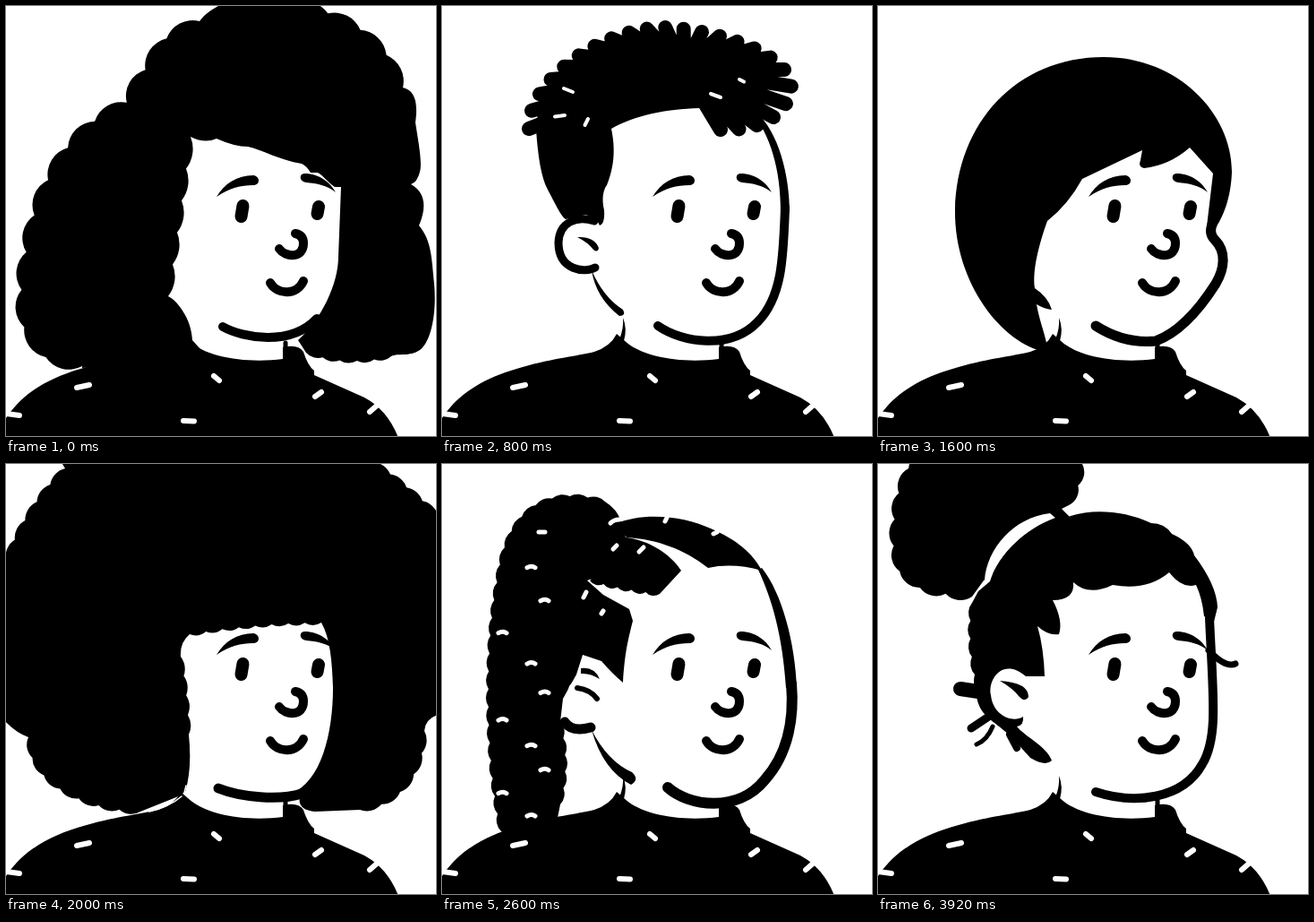
An HTML page that plays this animation: 480x480 px, repeating every 4250 ms.

```html
<!DOCTYPE html>
<html lang="en">
<head>
<meta charset="utf-8">
<title>Hairstyles</title>
<style>
  html, body { margin: 0; height: 100%; overflow: hidden; background: #fff; }
  svg { display: block; width: 100vw; height: 100vh; }
  .line { fill: none; stroke: #000; stroke-linecap: round; stroke-linejoin: round; }
  .white { stroke: #fff; }
</style>
</head>
<body>
<svg viewBox="0 0 480 480">
  <path d="M-2 463C17 433 46 415 90 403C125 393 150 391 170 386Q188 380 195 366L203 373C224 393 270 399 309 394V381Q326 377 332 386Q337 402 344 407V412L400 437Q426 451 438 482H-2Z"/>
  <path class="line white" stroke-width="6" d="M79 426L93 423M232 413L238 418M345 436L352 431M198 463L210 463.5M0 455L15 457M406 453L414 446"/>
  <g id="hair"></g>
  <path class="line" stroke-width="5" d="M312 376V390"/>
  <path d="M235 213C244 198 258 189 276 189C284 190 284 200 276 200C262 200 250 203 235 213ZM333 187C350 187 362 197 368 208C358 200 347 198 335 197C327 196 327 187 333 187Z"/>
  <path class="line" stroke-width="14" d="M264.5 223L262.5 235M349 224L347.5 232"/>
  <path class="line" stroke-width="10" d="M305 271C312 281 332 282 332 265C332 258 328 255 323 254M295 309C303 323 325 323 332 307"/>
</svg>
<script>
const fill = (d, color = '#000') => `<path d="${d}" fill="${color}"/>`;
const line = (d, width, cls = '') => `<path class="line ${cls}" stroke-width="${width}" d="${d}"/>`;
const white = (d, width) => line(d, width, 'white');
const ball = (x, y, r) => `<circle cx="${x}" cy="${y}" r="${r}"/>`;

// Evenly spaced points on a curve, about one every `step` units.
function along(d, step) {
  const path = document.createElementNS('http://www.w3.org/2000/svg', 'path');
  path.setAttribute('d', d);
  const length = path.getTotalLength();
  const count = Math.round(length / step);
  return Array.from({ length: count + 1 }, (_, i) => path.getPointAtLength(length * i / count));
}

// Scalloped edge with bumps to the left of the curve; higher flatness gives shallower bumps.
function curl(d, step, flatness = .7) {
  const r = step * flatness;
  return along(d, step).map(({ x, y }, i) => i ? `A${r} ${r} 0 0 1 ${x} ${y}` : `L${x} ${y}`).join('');
}

// Thick strands running from the crown to a curve.
const strands = (d, step, width) =>
  line(along(d, step).map(({ x, y }) => `M270 70L${x} ${y}`).join(''), width);

const nape = fill('M202 348Q207 360 203 374L198 372Q203 360 202 348Z');
const chin = line('M242 358C265 371 318 380 347 349', 10);
const ear = fill('M172 292C160 298 129 296 130 263C131 240 150 234 174 240Z', '#fff') +
  line('M171 292C160 298 130 296 130 264C131 241 150 234 170 240', 9) +
  fill('M151 258Q170 257 175 270Q174 276 169 272Q163 264 151 258Z') +
  fill('M167 295Q180 325 202 339Q206 346 198 346Q172 326 167 295Z') + nape;
const side = line('M241 357C268 376 322 384 352 353C380 325 381 280 383 225', 10) +
  fill('M388 230C388 190 376 140 350 118L346 118C366 145 378 180 378 230Z') + ear;
const cap = fill('M150 240C105 200 110 55 260 55C330 57 375 100 378 165C340 150 310 130 290 100C260 150 210 165 190 185L180 243Q165 235 150 240Z');
const hairline = 'Q280 108 192 142Q196 200 182 215L178 243Q165 235 150 240Z';
const innerFace = 'L335 368C365 330 372 270 366 190' + curl('M366 190Q280 150 205 175', 40) +
  'Q185 220 190 260Q180 310 200 370Z';

function braidMarks() {
  let d = 'M108 76h7M158 149l3 -6M178 167l2 -3M191 95l4 -4M220 98l5 -5M188 66Q192 62 198 62M249 64l2 -4M303 78l4 -2';
  for (let i = 1; i < 11; i++) {
    const x = [63, 95, 110][i % 3];
    const y = 78 + 31.5 * i + 20 * Math.sin(Math.PI * i / 10);
    d += `M${x} ${y}q5 -3 9 0`;
  }
  return white(d, 5);
}

const styles = [
  // big side curls
  fill('M85 404' + curl('M85 402C10 400 12 340 22 280C30 210 70 130 130 114C155 85 165 25 216 17', 44) +
    'C225 5 235 2 250 -8H320' + curl('M320 -2Q418 15 443 91', 45) +
    'C460 95 459 115 457 130C460 150 465 175 462 185Q459 197 452 199Q475 212 461 245C475 262 475 280 478 310C481 345 474 375 462 384C450 392 438 387 430 391' +
    curl('M430 391Q380 403 335 387', 18, 1) +
    'L326 373C352 350 371 310 371 280L374 202H367C358 196 355 190 348 186H340Q335 178 330 176C305 172 285 160 270 157Q255 157 235 148Q222 154 206 146' +
    curl('M206 146Q197 210 181 324', 36, 1) + 'C190 328 207 348 208 373L225 392Z') + chin,
  // bob
  fill('M200 372C120 360 80 290 90 200C100 90 190 50 260 55C350 60 415 130 412 220C411 280 408 340 392 370L345 374L335 366C370 330 374 270 372 195Q290 180 205 165Q185 250 200 372Z') + chin,
  // long and straight
  fill('M55 466C25 400 20 250 70 150C110 75 180 49 250 49C340 49 385 110 398 190C420 250 423 330 417 455L345 412L330 375C370 330 372 260 366 195Q310 150 285 105Q250 170 200 190C175 260 190 320 200 370C215 400 225 430 220 468Z') + chin,
  // wide curls
  fill('M190 370' + curl('M190 370C90 385 45 330 48 250C55 120 150 36 260 36C370 36 450 140 448 250C446 330 410 375 345 375', 46) + innerFace) + chin,
  // short twists
  side + fill('M105 138C107 165 110 190 118 205C125 218 133 235 138 238L160 233Q172 235 176 245Q182 243 181 228C178 215 180 205 184 200C190 185 195 165 189 137C215 122 250 115 287 114L345 110L358 85L338 62L290 45L240 42L190 52L140 80L108 110Z') +
    strands('M97 137C95 85 175 24 250 24C300 26 385 50 390 88C388 125 350 140 311 138', 21, 16) +
    white('M136 92L146 96M126 123.5L137 122M159.5 133L163 126M300 98L311 102M332 82L337 84.5', 4),
  // bald
  line('M241 357C268 374 325 386 355 353C385 325 394 290 394 230C394 120 340 58 265 58C180 60 135 150 152 236', 9) + ear,
  // quiff
  side + fill('M150 240C130 200 130 150 150 130C140 80 190 45 250 45C300 20 380 10 427 40C425 90 400 130 355 135C300 140 240 125 195 145Q195 200 182 215L178 243Q165 235 150 240Z'),
  // back bun
  side + ball(108, 180, 40) + cap,
  // smooth bowl
  fill('M187 386C140 378 85 310 86 228C88 130 155 57 252 57C335 57 395 120 395 185C394 215 385 235 378 246L367 246L374 187L348 158Q325 178 297 181Q290 180 293 172L295 161L228 193Q212 222 189 240C180 265 172 295 175 315Q190 325 194 339Q185 338 177 333C180 350 185 362 188 376Z') +
    line('M243 357C268 373 290 376 310 374C340 363 363 332 377 310C387 293 389 274 376 261Q369 254 373 244', 11) + nape,
  // long waves
  fill('M200 385' + curl('M200 385C90 410 15 370 18 290C40 130 120 58 250 58C350 58 405 140 405 290Q405 370 340 378', 48) + innerFace) + chin,
  // huge afro
  fill('M150 388' + curl('M150 388C85 385 25 355 25 305', 22, .9) + 'Q10 300 -5 283V107' +
    curl('M0 107Q25 45 66 5', 24, .9) + 'L60 -5H410' + curl('M410 -2Q440 18 482 57', 24, .9) +
    'V280Q468 284 467 298' + curl('M467 298C466 350 435 382 395 386', 24, .9) +
    'L345 388Q325 386 328 372L318 368C352 355 365 300 365 250C364 220 362 195 352 177' +
    curl('M352 177Q270 178 205 190', 18, 1) + 'Q194 199 195 215' + curl('M195 215Q203 260 204 302', 24, 1) +
    'Q208 340 200 366L190 372Z') +
    line('M237 362C262 372 305 376 330 368', 11) + white('M160 388Q182 383 196 371M199 367L201 359', 1.5),
  // high bun
  side + ball(125, 58, 64) + cap,
  // flat top
  side + fill('M150 240L120 130L115 42Q230 3 352 30L372 132' + hairline),
  // braided ponytail
  line('M252 361C275 382 330 390 360 353C388 322 393 280 390 245', 12) +
    fill('M396 250C394 200 380 145 357 116L353 118C368 150 380 190 384 250Z') +
    fill('M70 412' + curl('M66 410C48 330 48 200 62 130C72 45 120 24 182 42', 20, .9) +
      'Q195 50 200 64L205 82L190 120L162 130L180 146L209 162L213 175C208 195 204 210 202 244Q190 234 178 220L157 213L150 235L135 262L132 288' +
      curl('M132 288Q143 335 132 380', 20, .9) + 'L128 400Z') +
    fill('M165 131L190 82H206C230 85 255 100 267 119L243 145' + curl('M243 145Q205 141 165 130', 15, .8) + 'Z') +
    fill('M193 67C225 53 270 58 300 72C330 85 347 100 357 119Q325 110 297 116C270 95 240 84 206 82Z') +
    fill('M166 292C140 295 134 270 142 248Q155 228 176 238L174 290Z', '#fff') +
    line('M137 288Q145 300 166 294', 11) + fill('M155 228Q170 226 176 240Q165 233 155 234Z') +
    line('M151 250Q166 252 173 262', 6) + fill('M167 297Q185 332 212 344Q221 352 211 358Q180 342 167 297Z') +
    nape + braidMarks(),
  // cropped curls
  side + fill('M150 240' + curl('M140 238C90 130 150 55 255 55Q350 55 370 140', 32) + hairline),
  // round afro
  fill('M185 342' + curl('M185 342C90 335 63 265 67 195C72 85 150 28 250 28C350 28 415 100 416 195C418 245 405 280 382 298', 28, .85) +
    'C371 270 365 230 362 167' + curl('M362 167Q280 164 200 169', 20, 1) +
    'Q195 172 197 182Q198 200 194 209Q188 230 178 233Q165 238 157 235C143 233 130 245 130 260C130 278 142 288 156 292C178 316 198 328 204 366L196 370Q190 356 185 342Z') +
    line('M246 363C275 376 325 380 353 347C375 322 379 285 366 215', 12) +
    line('M149 286Q154 289 157 287', 9) + line('M140 253Q150 246 159 261', 7) + ball(145, 259, 4.5),
  // short spikes
  side + fill('M150 240C110 180 110 130 130 95Q180 50 260 45Q340 55 368 132' + hairline) +
    strands('M110 115C120 30 230 15 300 30Q370 50 388 105', 28, 20),
  // puff with a band
  line('M243 366C285 380 340 375 362 335C380 305 374 260 370 172', 10) +
    fill('M118 130L105 148' + curl('M105 148C30 142 14 130 18 70Q20 30 34 5', 28, .8) + 'L36 -5H228' +
      curl('M228 0Q226 25 213 46', 24, .8) + 'L205 50L215 60Z') +
    fill('M119 129C122 95 150 60 192 55L199 61C165 72 135 100 125 131Z', '#fff') +
    fill('M112 142L125 131C135 100 165 72 198 60Q212 60 215 58C240 50 275 52 305 66Q320 66 328 78Q350 88 353 102Q378 135 379 160L375 176L364 170Q362 150 355 135Q340 140 325 121Q300 142 262 135Q235 148 218 132Q220 152 195 152Q207 175 202 190Q190 192 178 181Q185 205 186 237L165 237C140 215 122 240 126 258C128 280 150 290 162 282Q163 292 155 293C165 305 188 315 194 331Q187 338 170 328L152 308C130 285 115 285 110 260Q105 245 108 235' +
      curl('M108 235Q100 195 105 155', 20, .9) + 'Z') +
    line('M92 251L112 254', 16) + line('M104 295L122 283', 9) + line('M110 313Q122 308 128 293', 5) +
    line('M147 302L155 317', 8) + line('M369 208Q388 228 399 223', 7) +
    fill('M136 242Q168 244 168 260Q164 267 157 259Q150 250 136 242Z') + nape
];

const hair = document.getElementById('hair');
hair.innerHTML = styles.map(s => `<g display="none">${s}</g>`).join('');
let shown = hair.children[0];

function draw(now) {
  const t = now % 4250;
  const index = t < 2600 ? Math.floor(t / 200) : Math.min(17, 13 + Math.floor((t - 2600) / 330));
  shown.setAttribute('display', 'none');
  shown = hair.children[index];
  shown.setAttribute('display', 'inline');
  requestAnimationFrame(draw);
}
draw(0);
</script>
</body>
</html>
```
